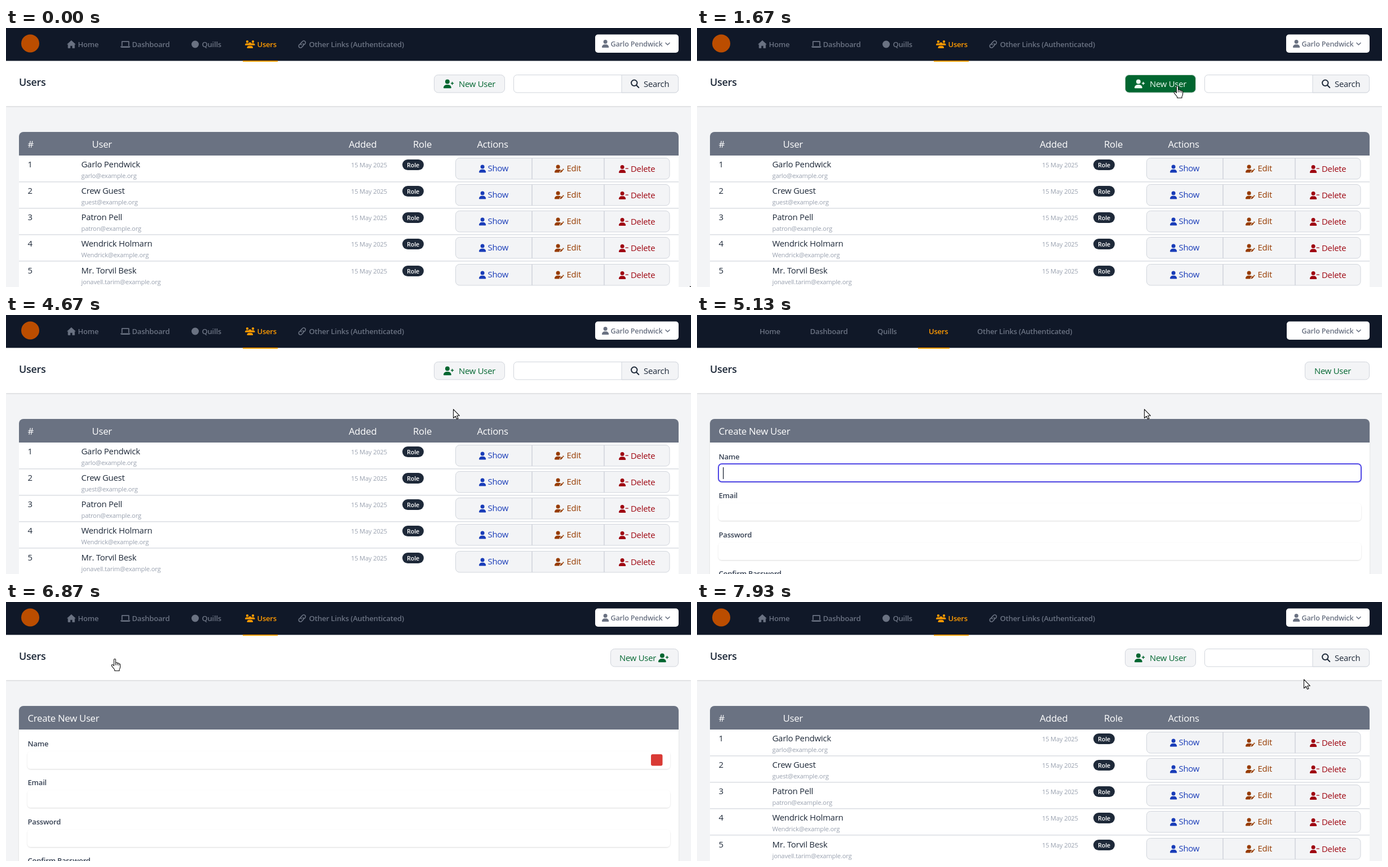
An HTML page that plays this animation: 1215 px wide and 461 px high, repeating every 8000 ms.

```html
<!DOCTYPE html>
<html lang="en">
<head>
<meta charset="utf-8">
<title>Users</title>
<style>
  html, body { margin: 0; width: 100%; height: 100%; overflow: hidden; background: #f3f4f6; }
  svg { display: block; width: 1215px; height: 461px; }
  text { font-family: "Open Sans", "Noto Sans", sans-serif; letter-spacing: -0.016em; white-space: pre; }
</style>
</head>
<body>
<svg id="stage" viewBox="0 0 1215 461" xmlns="http://www.w3.org/2000/svg"></svg>
<script>
const C = {
  nav: '#101828', slate: '#6a7282', pale: '#f3f4f6', line: '#d1d5dc', mute: '#99a1af', ink: '#1e2939',
  label: '#364153', amber: '#fe9a00', logo: '#bb4d00', blue: '#193cb8', brown: '#973c00',
  red: '#9f0712', green: '#016630', ring: '#4f46e5'
};
const FONT_SCALE = 0.93;

// ---------- drawing helpers ----------
const text = (x, y, str, size, fill, weight = 400) =>
  `<text x="${x}" y="${y}" font-size="${(size * FONT_SCALE).toFixed(2)}" font-weight="${weight}" fill="${fill}">${str}</text>`;
const bold = (x, y, str, size, fill) => text(x, y, str, size, fill, 600);
const rect = (x, y, w, h, fill, r = 0, extra = '') =>
  `<rect x="${x}" y="${y}" width="${w}" height="${h}" rx="${r}" fill="${fill}" ${extra}/>`;
const path = (d, extra = '') => `<path d="${d}" ${extra}/>`;
const group = (body, extra = '') => `<g ${extra}>${body}</g>`;
const box = (x, y, w, h, fill = C.pale, stroke = C.line, r = 7) =>
  rect(x + .5, y + .5, w - 1, h - 1, fill, r, `stroke="${stroke}"`);
const strokes = (d, w, color) =>
  path(d, `fill="none" stroke="${color}" stroke-width="${w}" stroke-linecap="round" stroke-linejoin="round"`);

// ---------- icons (drawn on a 512 unit grid) ----------
const person = 'M224 256a128 128 0 1 0 0-256a128 128 0 1 0 0 256zM178 304C80 304 0 384 0 482q0 30 30 30H418q30 0 30-30C448 384 368 304 270 304z';
const place = (x, y, size, color, body) =>
  group(body, `transform="translate(${x} ${y}) scale(${size / 512})" fill="${color}"`);
const icons = {
  user: () => path(person),
  plus: c => path(person) + strokes('M440 224h128M504 160v128', 48, c),
  minus: c => path(person) + strokes('M448 224h150', 50, c),
  pen: () => path('M224 256a128 128 0 1 0 0-256a128 128 0 1 0 0 256zM178 304C80 304 0 384 0 482q0 30 30 30H322q-8-10-5-25l18-76L430 345Q360 304 270 304z') +
    path('M350 512l20-82L492 308l62 62L432 492zM514 286l26-26q18-16 36 0l26 26q16 18 0 36l-26 26z'),
  home: c => path('M288 10L20 255h56v245h140V350h144v150h140V255h56z', `stroke="${c}" stroke-width="24" stroke-linejoin="round"`),
  laptop: c => strokes('M100 340V75h440V340', 64, c) + path('M0 384h640q0 92-90 92H90q-90 0-90-92z'),
  users: () => path('M144 0a80 80 0 1 1 0 160a80 80 0 1 1 0-160zM512 0a80 80 0 1 1 0 160a80 80 0 1 1 0-160zM320 128a96 96 0 1 1 0 192a96 96 0 1 1 0-192zM107 192h85q12 0 30 8q-12 70 40 120H21q-21 0-21-21q0-107 107-107zM418 200q18-8 30-8h85q107 0 107 107q0 21-21 21H378q52-50 40-120zM261 352H379q133 0 133 133q0 27-27 27H155q-27 0-27-27q0-133 133-133z'),
  link: c => strokes('M270 300a112 112 0 0 1 0-158l70-70a112 112 0 0 1 200 60q5 50-30 90l-50 50M370 212a112 112 0 0 1 0 158l-70 70a112 112 0 0 1-200-60q-5-50 30-90l50-50', 60, c)
};
const icon = (name, x, y, size, color) => place(x, y, size, color, icons[name](color));
const dot = (cx, cy, r, color) => `<circle cx="${cx}" cy="${cy}" r="${r}" fill="${color}"/>`;

// ---------- navigation bar ----------
const tabs = ['Home', 'Dashboard', 'Quills', 'Users', 'Other Links (Authenticated)'];
const tabColor = i => i === 3 ? C.amber : C.slate;
const tabRow = xs => tabs.map((s, i) => bold(xs[i], 34, s, 14, tabColor(i))).join('');
const underline = (x, w) => rect(x, 58, w, 2, C.amber);
const account = x =>
  rect(x, 11.5, 1193 - x, 32.5, '#fff', 5) + bold(1072.5, 33, 'Garlo Pendwick', 13.6, C.slate) +
  strokes('M1170 26.5l3.5 3.5l3.5-3.5', 1.6, C.slate);

const navFull = tabRow([127.5, 223.5, 347.5, 445.5, 537.5]) + account(1045) +
  dot(43, 27.5, 16, C.logo) +
  icon('home', 108, 22, 14, C.slate) + icon('laptop', 203, 22, 14, C.slate) + dot(335.5, 29, 6.5, C.slate) +
  icon('users', 424, 22, 14, C.amber) + icon('link', 516.5, 22, 14, C.slate) +
  icon('user', 1057, 21, 14, C.slate) + underline(420, 62);
const navBare = tabRow([111, 200.5, 320, 411, 497]) + account(1046) + underline(392, 56);

// ---------- list page ----------
const people = [
  ['Garlo Pendwick', 'garlo@example.org'],
  ['Crew Guest', 'guest@example.org'],
  ['Patron Pell', 'patron@example.org'],
  ['Wendrick Holmarn', 'Wendrick@example.org'],
  ['Mr. Torvil Besk', 'jonavell.tarim@example.org']
];
const ROW = 47.25, TOP = 227;

function row([name, mail], i) {
  const y = Math.floor(i * ROW);
  const del = c => group(icon('minus', 1087, 244, 14, c), 'class="icon"') + text(1108, 256, 'Delete', 16, c);
  return group(
    group(text(38.5, 248, i + 1, 16, 'currentColor') + text(133.5, 248, name, 16, 'currentColor'), `id="who${i}" color="${C.ink}"`) +
    text(133.5, 267, mail, 12, C.mute) + text(612, 247.5, '15 May 2025', 12, C.mute) +
    rect(703, 234, 38, 19, C.ink, 9.5) + bold(711, 248, 'Role', 11.6, '#fff') +
    box(797, 231, 380.5, 38.5) + path('M933 231.5v37.5M1061 231.5v37.5', `stroke="${C.line}" stroke-width="1.6"`) +
    group(icon('user', 839, 243.5, 14, C.blue) + icon('pen', 973, 243.5, 14, C.brown), 'class="icon"') +
    text(854.5, 255, 'Show', 16, C.blue) + text(994.5, 255, 'Edit', 16, C.brown) + del(C.red) +
    group(path('M1062 232h108a7 7 0 0 1 7 7v23a7 7 0 0 1-7 7h-108z', `fill="${C.red}"`) + del('#fff'), `id="del${i}"`) +
    rect(23, 273.3, 1170, 1.2, C.line),
    `transform="translate(0 ${y})"`);
}

const cardHead = path('M23 227V193a8 8 0 0 1 8-8H1185a8 8 0 0 1 8 8v34z', `fill="${C.slate}"`);
const newLabel = c => group(icon('plus', 776, 91.5, 15.8, c), 'class="icon"') + text(803, 105, 'New User', 16, c);

const list =
  box(759, 83, 126, 32.5) + newLabel(C.green) +
  group(box(759, 83, 126, 32.5, C.green, '#c4d6cc') + newLabel('#f0fdf4'), 'id="hot"') +
  box(900, 83, 293, 32.5, '#fff', C.line, 6) +
  path('M1092 83.5h94.5a6 6 0 0 1 6 6v19.5a6 6 0 0 1-6 6h-94.5z', `fill="${C.pale}" stroke="${C.line}"`) +
  group(strokes('M1119.5 97.8a5.2 5.2 0 1 1-10.4 0a5.2 5.2 0 1 1 10.4 0M1118.3 102l4 4', 2, C.ink), 'class="icon"') +
  text(1131, 105, 'Search', 16, C.ink) +
  rect(23, 190, 1170, 290, '#fff') + cardHead +
  [['#', 38.5], ['User', 152.5], ['Added', 608], ['Role', 722], ['Actions', 835.5]]
    .map(([s, x]) => text(x, 213, s, 18, '#fff')).join('') +
  people.map(row).join('');

// ---------- form page ----------
const field = (label, y) =>
  bold(38.5, y, label, 14, C.label) + rect(38, y + 9, 1140, 31, '#fff', 6, 'filter="url(#soft)"');
const form =
  group(box(1072, 83, 121, 32.5) + text(1088, 105, 'New User', 16, C.green) + icon('plus', 1157, 91.5, 15.8, C.green), 'id="newFull"') +
  group(box(1078, 83, 115, 32.5) + text(1095, 105, 'New User', 16, C.green), 'id="newBare"') +
  rect(23, 190, 1170, 290, '#fff', 0, 'filter="url(#soft)"') + cardHead + text(38.5, 213, 'Create New User', 18, '#fff') +
  field('Name', 257) + field('Email', 326) + field('Password', 396) + field('Confirm Password', 465) +
  rect(38, 265, 1140, 32, '#fff', 6, `id="focus" stroke="${C.ring}" stroke-width="2"`) +
  rect(46, 271, 1.2, 21, '#101828', 0, 'id="caret"') +
  rect(1144, 271, 20.5, 20.5, '#d93a35', 3, 'id="badge"');

// ---------- pointer ----------
const outline = 'fill="#fff" stroke="#111" stroke-width="1.1" stroke-linejoin="round"';
const arrow = path('M.5 .8V16.5L4.2 13.2L6.6 18.3L9 17.2L6.7 12.2H11.3z', outline);
const hand = path('M-1.5 12.5V1.8a1.5 1.5 0 0 1 3 0V7q2.7-.8 2.8 .8q2.4-.6 2.8 1q2.5-.3 2.5 1.8V14.5q0 2.5-1.6 4.5V21.5H-.2V19.5L-5.3 13.2q-1.2-2.7 1-2.7q1 0 2.8 2zM1.5 7.5v4M4.3 8.5v3M7.1 9.5v2.5', outline);

document.getElementById('stage').innerHTML =
  `<defs><filter id="soft" x="-2%" y="-30%" width="104%" height="170%">
    <feDropShadow dx="0" dy="1" stdDeviation="1" flood-color="#000" flood-opacity=".14"/></filter></defs>` +
  rect(0, 0, 1215, 461, C.pale) + rect(0, 50, 1215, 89, '#fff', 0, 'filter="url(#soft)"') +
  rect(0, 0, 1215, 58.5, C.nav) + group(navFull, 'id="navFull"') + group(navBare, 'id="navBare"') +
  bold(23, 103, 'Users', 19.3, C.ink) +
  group(list, 'id="list"') + group(form, 'id="form"') +
  group(group(arrow, 'id="arrow"') + group(hand, 'id="hand"'), 'id="pointer"');

// ---------- animation ----------
const LOOP = 8000, STEP = 200 / 3;
const track = [
  [200, 1213, 459], [600, 1165, 325], [1067, 1087, 144], [1133, 1040, 132], [1267, 969, 121],
  [1467, 892, 117], [1667, 852, 103], [4333, 852, 103], [4400, 847, 110], [4533, 815, 146],
  [4667, 793, 167], [5600, 793, 167], [5933, 520, 112], [6267, 250, 81], [6467, 195, 100],
  [6533, 193, 101], [7200, 193, 101], [7600, 650, 150], [7933, 1076, 137]
];
const el = id => document.getElementById(id);
const show = (id, on) => el(id).setAttribute('visibility', on ? 'inherit' : 'hidden');
const within = (v, a, b) => v >= a && v < b;
const clamp = v => Math.max(0, Math.min(1, v));

function pointerAt(t) {
  const i = track.findIndex(k => k[0] > t);
  if (i === 0) return track[0].slice(1);
  if (i < 0) return track[track.length - 1].slice(1);
  const [t0, x0, y0] = track[i - 1], [t1, x1, y1] = track[i];
  const f = (t - t0) / (t1 - t0);
  return [x0 + (x1 - x0) * f, y0 + (y1 - y0) * f];
}

const iconParts = document.querySelectorAll('.icon');

function draw(time) {
  // the screen refreshes fifteen times a second
  const t = Math.floor((time + 4) / STEP) * STEP + 1;
  const [x, y] = pointerAt(t);
  const onForm = within(t, 5133, 7266);
  const bare = within(t, 5133, 5199) || within(t, 7266, 7332);

  show('navFull', !bare);
  show('navBare', bare);
  show('list', !onForm);
  show('form', onForm);
  if (onForm) {
    show('newFull', !bare);
    show('newBare', bare);
  }
  iconParts.forEach(p => p.setAttribute('opacity', bare ? 0 : 1));

  el('hot').setAttribute('opacity', clamp((t - 1467) / 150) * clamp((4620 - t) / 150));

  const focused = t < 6866;
  show('focus', focused);
  show('caret', focused && (t < 5666 || within(t, 6199, 6732)));
  show('badge', t > 5332);

  const rowIndex = Math.floor((y - TOP) / ROW);
  const rowY = y - TOP - rowIndex * ROW;
  const onDelete = within(x, 1062, 1177) && within(rowY, 4, 42);
  people.forEach((_, i) => {
    const over = !onForm && i === rowIndex && x < 1193;
    el('who' + i).setAttribute('color', over ? '#4a5565' : C.ink);
    show('del' + i, over && onDelete);
  });

  const pressing = (t < 1067 && y > TOP && onDelete) || within(t, 1533, 4466) || within(t, 6466, 7266);
  show('arrow', !pressing);
  show('hand', pressing);
  el('pointer').setAttribute('transform', `translate(${Math.round(x)} ${Math.round(y)})`);
}

const start = performance.now();
function tick(now) {
  draw(Math.max(0, now - start) % LOOP);
  requestAnimationFrame(tick);
}
draw(0);
requestAnimationFrame(tick);
</script>
</body>
</html>
```
